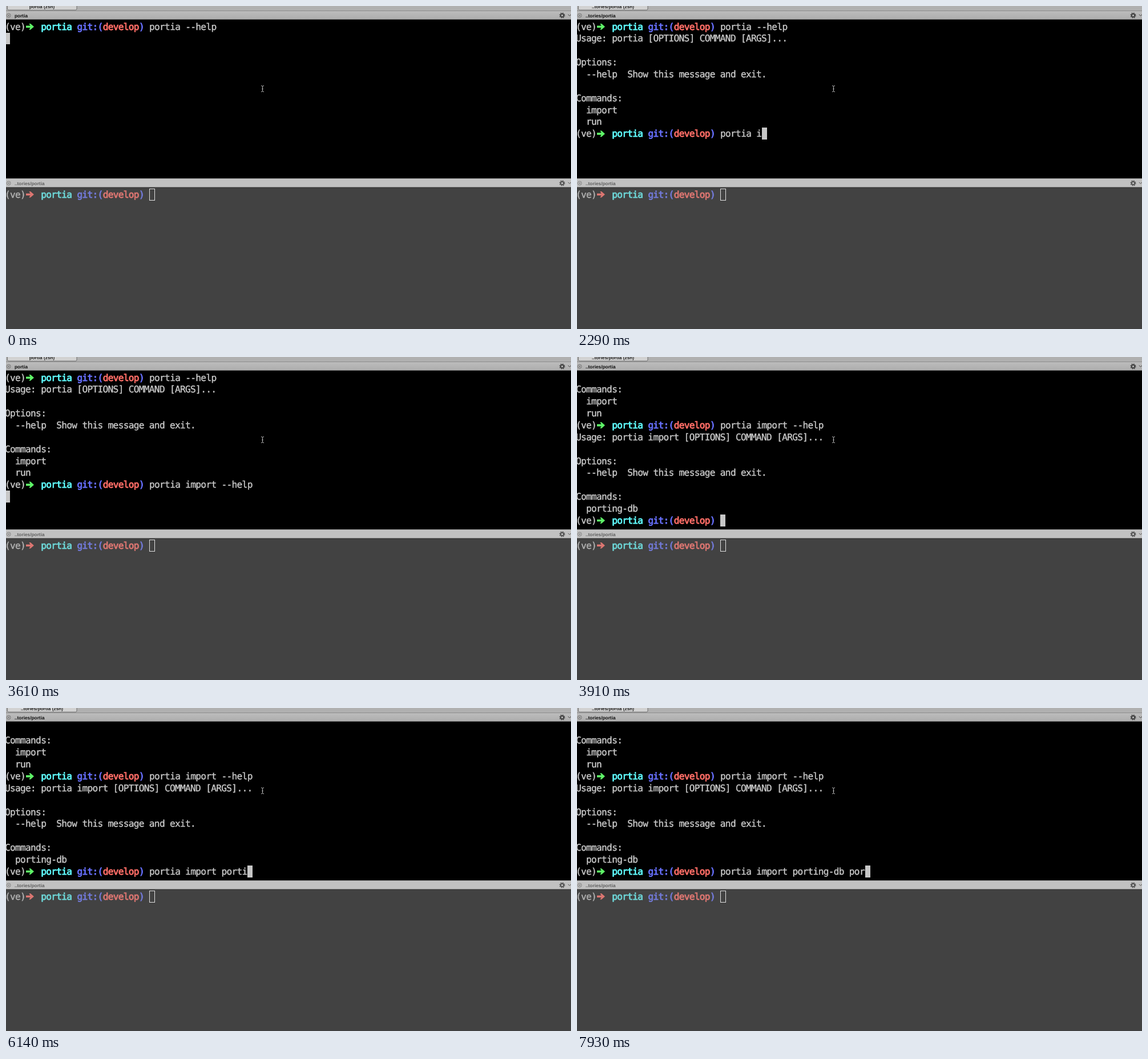
These frames come from a looping animation (990 by 566 pixels, 8 s). An HTML page:

```html
<!DOCTYPE html>
<html lang="en">
<head>
<meta charset="utf-8">
<title>Terminal session</title>
<style>
  html, body { margin: 0; width: 100%; height: 100%; overflow: hidden; background: #000; }
  svg { display: block; width: 100%; height: 100%; }
  text { white-space: pre; text-rendering: geometricPrecision; }
  .mono { font: 16.2px "DejaVu Sans Mono", monospace; letter-spacing: -.713px; stroke-width: .4; }
  .bold { stroke-width: .85; }
  .ui { font: bold 8.3px "Liberation Sans", Arial, sans-serif; }
</style>
</head>
<body>
<svg viewBox="0 0 990 566" preserveAspectRatio="none">
  <defs>
    <linearGradient id="bar" x2="0" y2="1">
      <stop stop-color="#bcbcbc"/><stop offset="1" stop-color="#adadad"/>
    </linearGradient>
    <g id="controls" fill="none" stroke="#444">
      <circle cx="4.7" cy="7.5" r="3.4" stroke="#666" stroke-width=".8"/>
      <path d="M3.3 6.1l2.8 2.8m0-2.8l-2.8 2.8" stroke="#555" stroke-width=".8"/>
      <circle cx="974.5" cy="7.5" r="2.7" stroke-width="2.1"/>
      <circle cx="974.5" cy="7.5" r="4.3" stroke-width="1.5" stroke-dasharray="1.69"/>
      <path d="M984.8 5.8l2.7 2.5 2.7-2.5" stroke-width="1"/>
    </g>
  </defs>
  <rect width="990" height="566"/>
  <rect width="990" height="9" fill="#b0b0b0"/>
  <path d="M2.5-1V5q0 2 2 2H122q2 0 2-2V-1" fill="#d2d2d2" stroke="#666" stroke-width=".9"/>
  <text id="tab" class="ui" x="63" y="4" text-anchor="middle" fill="#222"></text>
  <rect y="9" width="990" height="14.6" fill="url(#bar)"/>
  <path d="M0 8.5H990" stroke="#8c8c8c"/>
  <use href="#controls" y="9"/>
  <text id="title" class="ui" x="15" y="19.6" fill="#111"></text>
  <g id="screen"></g>
  <path d="M447 139.7q2.5 0 2.5 1.6v7.4q0 1.6-2.5 1.6m5-10.6q-2.5 0-2.5 1.6m0 7.4q0 1.6 2.5 1.6m-3.7-5h2.4" fill="none" stroke="#bbb"/>
  <rect y="302.2" width="990" height="15.8" fill="#c1c1c1"/>
  <rect y="318" width="990" height="248" fill="#424242"/>
  <path d="M0 318H990" stroke="#2c2c2c"/>
  <use href="#controls" y="303" opacity=".85"/>
  <text class="ui" x="15" y="313.7" fill="#606060">..tories/portia</text>
  <g id="idle"></g>
</svg>
<script>
const LOOP = 8000, CELL = 9.04, ROW = 20.85, LEFT = -1.7, TOP = 25.75, PROMPT_COLS = 28;
const BRIGHT = { text: '#c7c7c7', arrow: '#5ffa68', dir: '#60fdff', git: '#6871ff', branch: '#ff6e67' };
const DIM = { text: '#b2b2b2', arrow: '#dc7671', dir: '#6dd5d6', git: '#727ad8', branch: '#dc7671' };
const $ = id => document.getElementById(id);

const colX = col => LEFT + col * CELL;
const rowY = row => TOP + row * ROW;
const run = (str, col, top, color, cls = '') =>
  `<text class="mono ${cls}" x="${(colX(col) - .4).toFixed(2)}" y="${(top + 15.8).toFixed(2)}" fill="${color}" stroke="${color}">${str}</text>`;

function prompt(top, c, command = '') {
  return run('(ve)', 0, top, c.text) +
    `<path transform="translate(35 ${top + 10.5})" d="M0-1.8H7.6L5.4-5.3H8L14 0 8 5.3H5.4L7.6 1.8H0Z" fill="${c.arrow}"/>` +
    run('portia', 7, top, c.dir, 'bold') +
    run('git:(', 14, top, c.git, 'bold') +
    run('develop', 19, top, c.branch, 'bold') +
    run(')', 26, top, c.git, 'bold') +
    run(command, PROMPT_COLS, top, c.text);
}

// Block cursor snapped to whole pixels
function cursor(col, row) {
  const [x, right] = [col, col + 1].map(n => Math.round(colX(n)));
  const [y, bottom] = [row, row + 1].map(n => Math.round(rowY(n)));
  return `<rect x="${x}" y="${y}" width="${right - x}" height="${bottom - y}" fill="${BRIGHT.text}"/>`;
}

const HELP = 'portia --help', IMPORT_HELP = 'portia import --help';
const IMPORT = 'portia import porting-db por';
const options = ['', 'Options:', '  --help  Show this message and exit.', '', 'Commands:'];
const usage = ['Usage: portia [OPTIONS] COMMAND [ARGS]...', ...options, '  import', '  run'];
const importUsage = ['Usage: portia import [OPTIONS] COMMAND [ARGS]...', ...options, '  porting-db'];
const cmd = command => ({ command });

// Each entry: time, number of typed characters
const typedHelp = [[950, 1], [1100, 3], [1240, 4], [1390, 6], [1540, 7],
  [2290, 8], [2440, 10], [2590, 11], [2740, 13], [2880, 15], [3030, 16], [3180, 18], [3320, 19], [3460, 20]];
const typedImport = [[4360, 1], [4510, 3], [4660, 5], [4810, 6], [4960, 8], [5110, 10], [5250, 11], [5400, 13],
  [5700, 14], [5840, 16], [5990, 17], [6140, 19], [6290, 21],
  [6590, 22], [6740, 23], [6880, 24], [7030, 25], [7930, 28]];
const typed = (keys, t) => keys.reduce((n, [at, count]) => t >= at ? count : n, 0);

function session(t) {
  const lines = [cmd(HELP)];
  if (t < 290) return [...lines, ''];
  lines.push(...usage);
  if (t < 500) return [...lines, ''];
  lines.push(cmd(IMPORT_HELP.slice(0, typed(typedHelp, t))));
  if (t < 3610) return lines;
  if (t < 3910) return [...lines, ''];
  return [...lines, ...importUsage, cmd(IMPORT.slice(0, typed(typedImport, t)))].slice(5);
}

function draw(t) {
  const lines = session(t), last = lines.length - 1, input = lines[last];
  const name = input ? '..tories/portia' : 'portia';
  $('title').textContent = name;
  $('tab').textContent = name + ' (zsh)';
  $('screen').innerHTML = lines.map((line, i) => typeof line === 'string'
    ? run(line, 0, rowY(i), BRIGHT.text)
    : prompt(rowY(i), BRIGHT, line.command)).join('') +
    cursor(input ? PROMPT_COLS + input.command.length : 0, last);
}

$('idle').innerHTML = prompt(319.8, DIM) +
  `<rect x="251.5" y="320.5" width="9" height="20" fill="none" stroke="#e0e0e0"/>`;

const start = performance.now();
function tick() {
  draw((performance.now() - start) % LOOP);
  requestAnimationFrame(tick);
}
tick();
</script>
</body>
</html>
```
